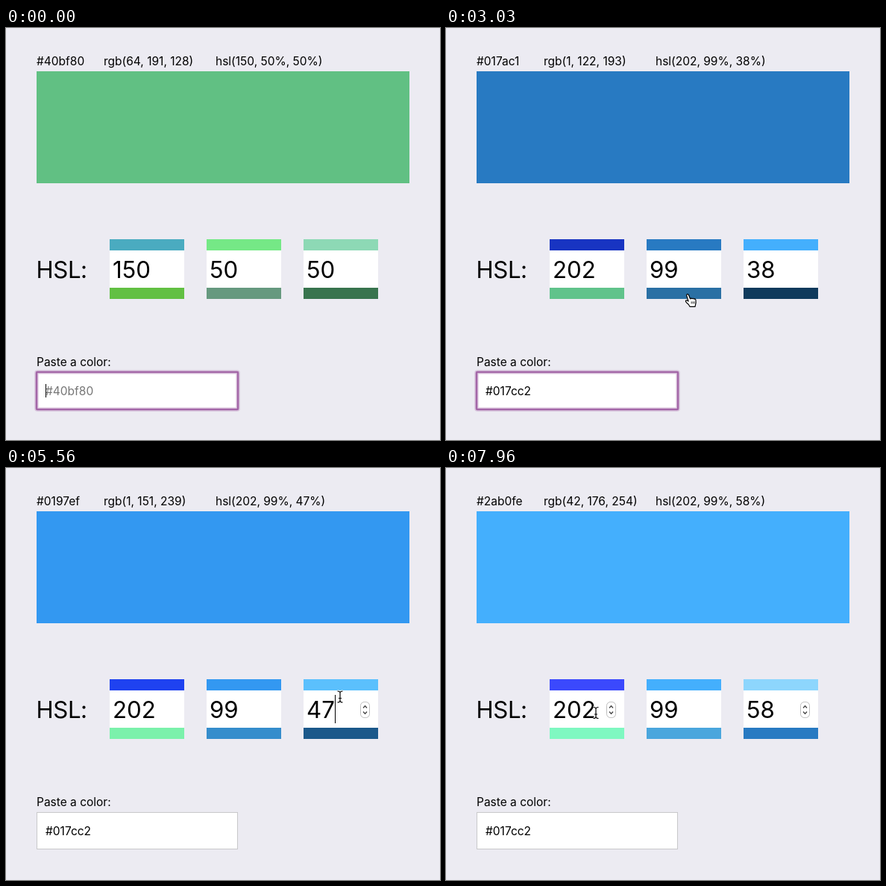
Write an HTML page that moves like this. It is 582 px wide and 552 px high and loops after 8 s.

```html
<!DOCTYPE html>
<html lang="en">
<head>
<meta charset="utf-8">
<title>Colour converter</title>
<style>
  html, body { margin: 0; width: 100%; height: 100%; overflow: hidden; background: #ecebf2; }
  svg { display: block; width: 582px; height: 552px; }
  text { font: 15.5px Inter, Roboto, sans-serif; fill: #000; white-space: pre; }
  .big { font-size: 31.2px; }
</style>
</head>
<body>
<svg id="stage" viewBox="0 0 582 552">
  <defs>
    <g id="spinner">
      <rect x=".5" y=".5" width="12" height="21" rx="5" fill="#fff" stroke="#bdbdbd"/>
      <path d="M4 8.5 6.5 5.7 9 8.5M4 13.5 6.5 16.3 9 13.5" fill="none" stroke="#444" stroke-width="1.3"/>
    </g>
  </defs>
</svg>
<script>
const LOOP = 8000;
const stage = document.getElementById('stage');

function add(tag, attrs, parent = stage) {
  const node = document.createElementNS('http://www.w3.org/2000/svg', tag);
  for (const key in attrs) node.setAttribute(key, attrs[key]);
  return parent.appendChild(node);
}
const rect = (x, y, width, height, fill) => add('rect', { x, y, width, height, fill });
const label = (x, y, content = '', cls = '') => {
  const node = add('text', { x, y, class: cls });
  node.textContent = content;
  return node;
};
const show = (node, on) => node.setAttribute('visibility', on ? 'visible' : 'hidden');

// Header and swatch
const hexText = label(41, 50);
const rgbText = label(131, 50);
const hslText = label(281, 50);
const swatch = rect(41, 58, 500, 150);

// Number fields
label(40.5, 335.3, 'HSL:', 'big').setAttribute('letter-spacing', '-.4');
const fields = [139, 269, 399].map(x => {
  rect(x, 298, 100, 50, '#fff');
  return {
    x,
    up: rect(x, 283, 100, 15),
    down: rect(x, 348, 100, 15),
    value: label(x + 4, 335.3, '', 'big'),
    spinner: add('use', { href: '#spinner', x: x + 76, y: 313 })
  };
});
const numberCaret = rect(443, 304, 1, 38, '#000');

// Paste field
label(41, 453, 'Paste a color:');
add('rect', { x: 41.5, y: 461.5, width: 269, height: 49, fill: '#fff', stroke: '#c8c8ca' });
const ring = add('g', { fill: 'none', stroke: '#a263a6' });
[[5.5, 0.28], [2.6, 0.95]].forEach(([w, o]) => add('rect', {
  x: 41, y: 461, width: 270, height: 50, rx: 1, 'stroke-width': w, 'stroke-opacity': o
}, ring));
const pasteText = label(53, 492);
const pasteCaret = rect(53, 477, 1, 18, '#000');

// Mouse pointers, each with its hot spot at 0,0
const cursor = add('g', {});
const pointers = { beam: add('g', {}, cursor), hand: add('g', {}, cursor), arrow: add('g', {}, cursor) };
const beam = 'M-3.5-7.5Q0-7.5 0-5V5Q0 7.5-3.5 7.5M3.5-7.5Q0-7.5 0-5V5Q0 7.5 3.5 7.5M-2 2H2';
add('path', { d: beam, fill: 'none', stroke: '#fff', 'stroke-width': 3 }, pointers.beam);
add('path', { d: beam, fill: 'none', stroke: '#000', 'stroke-width': 1.2 }, pointers.beam);
add('path', {
  d: 'M-3 0Q-2-2.2-.2-.5L2 5Q3.4 3.6 4.6 4.8 6 3.7 7.1 5.2 8.8 4.6 9.4 6.5L9.6 10 8.5 15.5H1.5Q.5 12.5-3.2 9.8-5 7.6-3.4 7-1.8 6.6-.5 8.3Z',
  fill: '#fff', stroke: '#000', 'stroke-width': 1.2, 'stroke-linejoin': 'round'
}, pointers.hand);
add('path', { d: 'M3.6 8.5V11.5M5.6 8.5V11.5M7.5 8.5V11.5', stroke: '#000', 'stroke-width': .8 }, pointers.hand);
add('path', {
  d: 'M0 0V14L3.2 11 5.4 16 7.8 15 5.6 10H10Z',
  fill: '#000', stroke: '#fff', 'stroke-width': 1.1
}, pointers.arrow);

// Screen colours: swatch, hue up, hue down, saturation up, saturation down, lightness up, lightness down
const GREEN = '61c083 4aabc0 62c043 75e886 66997f 8dd9b5 38744e';
const BLUES = [
  [38, '287ac2 1834c2 60c38b 287ac2 2a70a4 44affd 0f3a5c'],
  [47, '3398f1 1f42f0 7bf1ab 3398f1 358dcc 5bc0fd 1b588a'],
  [50, '36a1fd 2246fd 82fdb4 36a1fd 3c97d7 67c6fd 1e629a'],
  [58, '44affd 3b49fd 7ff8c1 44affd 4aa6dd 8dd6fd 287ac2']
];
const parse = list => list.split(' ').map(h => [0, 2, 4].map(i => parseInt(h.slice(i, i + 2), 16)));
const green = parse(GREEN);
const blues = BLUES.map(([l, list]) => [l, parse(list)]);

function palette(l) {
  const i = Math.max(1, blues.findIndex(([key]) => key >= l));
  const [l0, a] = blues[i - 1], [l1, b] = blues[i];
  const k = (l - l0) / (l1 - l0);
  return a.map((c, n) => c.map((v, j) => Math.round(v + (b[n][j] - v) * k)));
}

function hslToRgb(h, s, l) {
  s /= 100; l /= 100;
  const a = s * Math.min(l, 1 - l);
  return [0, 8, 4].map(n => {
    const k = (n + h / 30) % 12;
    return Math.round(255 * (l - a * Math.max(-1, Math.min(k - 3, 9 - k, 1))) + 1e-6);
  });
}

// Lightness climbs by one per key repeat
function lightness(t) {
  const repeats = (start, gap, max) =>
    t < start ? 0 : Math.min(max, Math.floor((t - start) / gap + 0.01) + 1);
  return 38 + (t >= 4730) + repeats(5030, 75.7, 8) + repeats(5680, 55, 3) + repeats(5910, 82.8, 8);
}

// Points are [progress, x, y]; the pointer moves in discrete steps
const ENTER = [[0, 316, 504], [.17, 322, 425], [.333, 325.5, 358], [.5, 352, 318], [.67, 398, 298], [.83, 435, 300], [1, 448, 306.5]];
const LEAVE = [[0, 446, 308], [.2, 420, 322], [.4, 375, 337], [.6, 300, 340], [.8, 235, 334], [1, 201, 328]];
function along(path, k) {
  const i = Math.max(1, path.findIndex(p => p[0] >= k));
  const [k0, x0, y0] = path[i - 1], [k1, x1, y1] = path[i];
  const f = (k - k0) / (k1 - k0);
  return [x0 + (x1 - x0) * f, y0 + (y1 - y0) * f];
}
const stepped = (t, start, gap, count) =>
  Math.max(0, Math.min(1, Math.floor((t - start) / gap + 0.01) / count));

function mouse(t) {
  return t < 7150 ? along(ENTER, stepped(t, 2800, 57.5, 12)) : along(LEAVE, stepped(t, 7150, 58, 10));
}

const within = (t, spans) => spans.some(([a, b]) => t >= a && t < b);

function draw(t) {
  const pasted = t >= 1310;
  const focused = t >= 3720;
  const hsl = pasted ? [202, 99, lightness(t)] : [150, 50, 50];
  const rgb = hslToRgb(...hsl);
  const colors = (pasted ? palette(hsl[2]) : green).map(c => `rgb(${c})`);

  hexText.textContent = '#' + rgb.map(v => v.toString(16).padStart(2, '0')).join('');
  rgbText.textContent = `rgb(${rgb.join(', ')})`;
  hslText.textContent = `hsl(${hsl[0]}, ${hsl[1]}%, ${hsl[2]}%)`;
  swatch.setAttribute('fill', colors[0]);

  pasteText.textContent = pasted ? '#017cc2' : '#40bf80';
  pasteText.style.fill = pasted ? '#000' : '#757575';
  ring.setAttribute('opacity', t < 3720 ? 1 : t < 3780 ? 0.5 : 0);
  pasteCaret.setAttribute('x', pasted ? 114 : 53);
  show(pasteCaret, within(t, [[0, 420], [900, 1790], [2330, 2800]]));

  const digit = hsl[2] % 10;
  numberCaret.setAttribute('x', 443 - (digit === 7 ? 2 : digit === 1 ? 4 : 0));
  show(numberCaret, within(t, [[3720, 4250], [4730, 6970], [7450, 7960]]));

  const [x, y] = mouse(t);
  const present = t >= 2800;
  const column = fields.findIndex(f => x >= f.x && x < f.x + 100);
  const inInput = column >= 0 && y >= 298 && y < 348;
  const onBar = column >= 0 && !inInput && y >= 283 && y < 363;
  const kind = inInput ? 'beam' : onBar ? 'hand' : 'arrow';
  cursor.setAttribute('transform', `translate(${x} ${y})`);
  for (const name in pointers) show(pointers[name], present && name === kind);

  fields.forEach((f, i) => {
    f.value.textContent = hsl[i];
    f.up.setAttribute('fill', colors[1 + i * 2]);
    f.down.setAttribute('fill', colors[2 + i * 2]);
    show(f.spinner, present && inInput && column === i || focused && i === 2);
  });
}

const begin = performance.now();
function tick() {
  draw((performance.now() - begin) % LOOP);
  requestAnimationFrame(tick);
}
tick();
</script>
</body>
</html>
```
